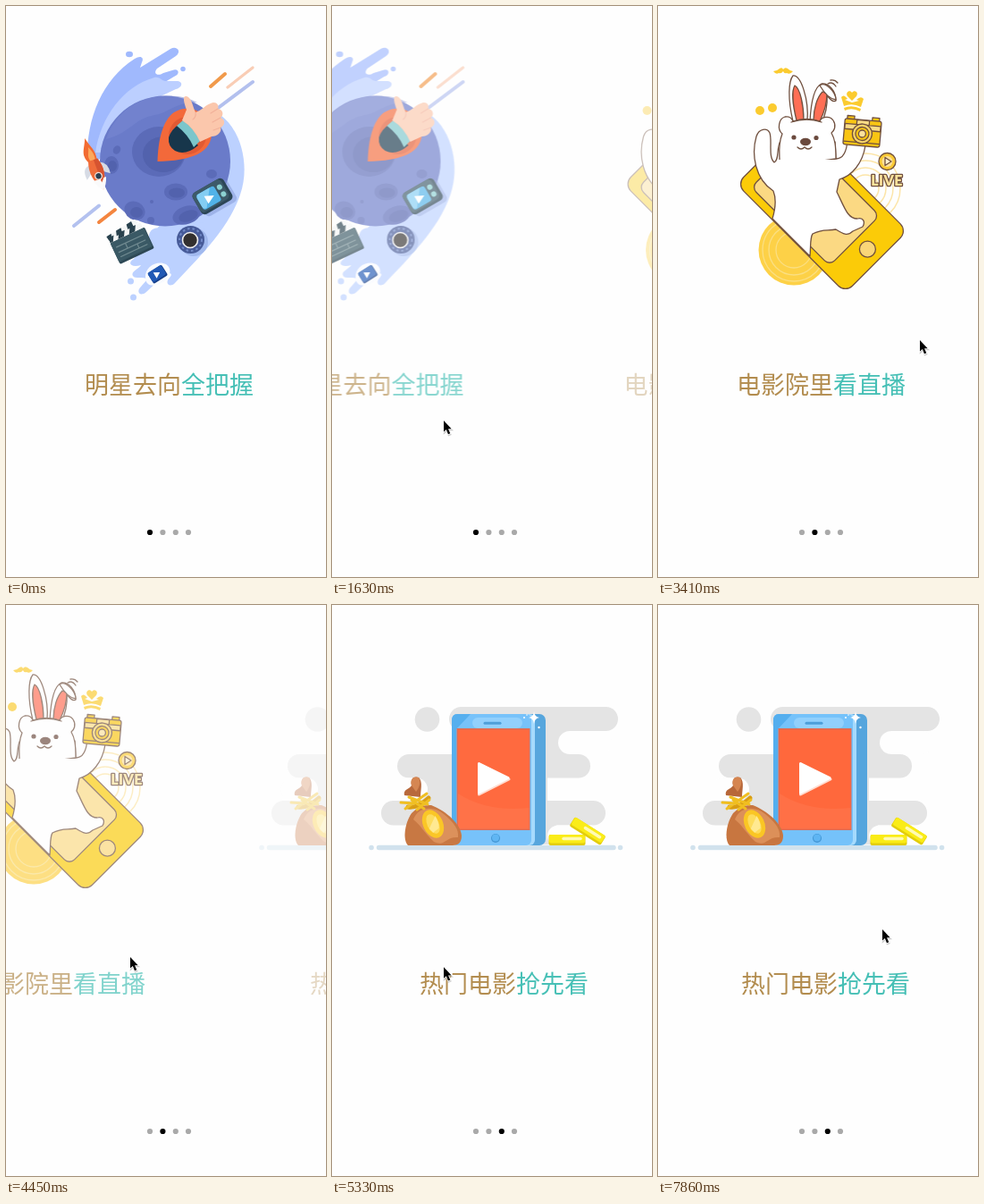
These frames come from a looping animation (358 px wide and 639 px high, 8000 ms). An HTML page:

```html
<!DOCTYPE html>
<html lang="zh">
<head>
<meta charset="utf-8">
<title>Onboarding</title>
<style>
html, body { margin: 0; width: 100%; height: 100%; overflow: hidden; background: #fefefe; }
svg { display: block; }
.title { font: 300 27px "Noto Sans CJK SC", "Noto Sans CJK", sans-serif; fill: #b28c4e; }
.title tspan { fill: #45bfb5; }
.ln { fill: none; stroke-linecap: round; stroke-linejoin: round; }
.ink { stroke: #70503f; stroke-width: 1.3; stroke-linejoin: round; stroke-linecap: round; }
</style>
</head>
<body>
<svg width="358" height="639" viewBox="0 0 358 639">
<g class="page">
  <!-- comet tail -->
  <path fill="#a0b9fd" d="M91 172C90 125 108 82 144 59C150 55 155 57 152 63L150 69L184 48C191 44 197 51 190 56L169 70C164 76 170 79 176 75L186 72C194 69 195 77 188 79L178 85L140 120L104 172Z"/>
  <path fill="#bccfff" d="M100 164C106 124 131 90 166 80C172 79 173 83 178 84L189 84C199 83 198 91 190 93L150 112L112 164Z"/>
  <g fill="#a0b9fd"><ellipse cx="138" cy="54" rx="4" ry="3.2"/><circle cx="198" cy="70.500" r="2.800"/></g>
  <path fill="#bcd1ff" d="M240 122C264 140 273 180 262 211C249 250 214 283 189 310C183 316 177 310 183 304C188 298 181 298 175 303L157 320C150 326 145 320 151 314L158 306C154 302 144 306 142 302C139 297 149 294 151 290C140 293 135 288 143 283L176 240L230 226Z"/>
  <g fill="#bcd1ff"><circle cx="139.500" cy="308" r="3.500"/><circle cx="142.500" cy="326" r="3.500"/></g>
  <g class="ln" stroke-width="4">
    <path stroke="#f19a4b" d="M229 90L245 76"/><path stroke="#f9cdb5" stroke-width="3.200" d="M248 91L276 69"/>
    <path stroke="#b3c0ee" d="M232 118L276 85"/><path stroke="#b3c1ef" d="M76 246L104 223.500"/>
    <path stroke="#f4853f" d="M104 242L122 228"/>
  </g>
  <!-- planet -->
  <circle cx="178" cy="173.500" r="73" fill="#6a7bc9"/>
  <path fill="#7889d3" opacity=".55" d="M112 149C123 118 149 101 179 100.500C195 100 205 103 214 108C190 107 183 119 166 122C143 126 139 142 112 149Z"/>
  <path fill="#bcd1ff" d="M160 256C162 248 170 247 174 250C180 252 186 247 193 248L208 241L225 243L215 264H160Z"/>
  <g fill="#5b6bb8">
    <ellipse cx="171" cy="163" rx="30" ry="28"/><ellipse cx="190" cy="208" rx="13" ry="9.500"/>
    <ellipse cx="144" cy="229" rx="12" ry="10" transform="rotate(30 144 229)"/>
    <ellipse cx="202" cy="234" rx="16" ry="10" transform="rotate(-18 202 234)"/>
    <ellipse cx="118" cy="178" rx="8" ry="10"/><ellipse cx="124" cy="161" rx="4" ry="5" transform="rotate(30 124 161)"/>
    <ellipse cx="230" cy="188" rx="6" ry="5"/><circle cx="163" cy="219" r="2"/><circle cx="162" cy="240" r="4"/>
  </g>
  <g fill="#5262ad">
    <ellipse cx="176" cy="166" rx="23" ry="20"/><ellipse cx="191" cy="209" rx="9" ry="5.500"/>
    <ellipse cx="146" cy="231" rx="7" ry="6"/><ellipse cx="204" cy="235" rx="11" ry="6" transform="rotate(-18 204 235)"/>
    <ellipse cx="119" cy="179" rx="5" ry="6"/>
  </g>
  <!-- pin and thumb -->
  <path fill="#f3693a" d="M169.500 174C170 151 175 128 188 119C205 108 227 119 230 139C232 165 206 173 169.500 174Z"/>
  <circle cx="203" cy="145" r="21" fill="#e15a33"/>
  <path fill="#17364b" d="M182 147Q185 138 194 132L215 156Q201 168 189 162Q181 157 182 147Z"/>
  <path fill="#7cc6cb" d="M191 134L198 128Q211 137 217 151L210 158Q204 144 191 134Z"/>
  <path fill="#fbc7ac" d="M197 128L202 116C199 108 197 100 202 101C208 103 209 113 212 119C219 117 224 110 229 109C234 106 239 110 237 115C243 116 244 122 240 125C246 127 245 134 240 136C242 141 236 146 230 146L217 152Q210 136 197 128Z"/>
  <path class="ln" stroke="#f2b29a" stroke-width="1.200" d="M212 119Q213 124 209 127M237 115L229 120M240 125L231 130M240 136L232 139"/>
  <!-- rocket -->
  <g transform="translate(102 186) rotate(-20) scale(.9)">
    <path fill="#f26b32" d="M-6-15C-12-28-5-32 0-45C2-34 8-26 5-15Z"/><path fill="#fca95d" d="M-3-15C-6-23-1-26 0-33C4-25 4-20 3-15Z"/>
    <path fill="#d6dbe5" d="M-7-11Q-17-10-15 5L-7-1ZM7-11Q17-7 15 7L7 1Z"/>
    <path fill="#ef6d3b" d="M-6-16H6Q13 4 0 23Q-13 4-6-16Z"/><path fill="#fafafa" d="M-8.500 9H8.500Q6 18 0 23Q-6 18-8.500 9Z"/>
    <path fill="#d65430" d="M1-16H6Q13 4 1 14Z"/>
    <circle cy="5" r="5" fill="#f3ddd4"/><circle cy="5" r="3.500" fill="#2c3f50"/>
  </g>
  <!-- television -->
  <g transform="translate(231 213) rotate(-30)">
    <rect x="-17" y="-10" width="40" height="28" rx="5" fill="#8196d4" opacity=".5"/>
    <rect x="-20" y="-14" width="40" height="28" rx="5" fill="#2c4657"/><rect x="-20" y="-14" width="37" height="25" rx="5" fill="#3d5a69"/>
    <rect x="-16" y="-10" width="23" height="19" rx="3" fill="#51b2e8"/><path fill="#83cdf3" d="M-14-10H2L-12 8Q-16 8-16 4V-7Z"/>
    <path fill="#fff" d="M-8-5L2 0L-8 5Z"/><circle cx="12" cy="-5" r="3" fill="#8cd1d2"/><circle cx="12" cy="4" r="3" fill="#8cd1d2"/>
  </g>
  <!-- clapper -->
  <g transform="translate(139.500 265.500) rotate(-25) scale(.9)">
    <rect x="-23" y="-11" width="47" height="29" rx="2" fill="#2d4855"/><rect x="-23" y="-11" width="46" height="26" rx="2" fill="#3a5965"/>
    <path class="ln" stroke="#718b91" stroke-width="1.300" d="M-18-3H18M-18 4H18M-18 10H18M-6-3V4M7 4V10"/>
    <path fill="#f4f6f6" d="M-23-18H22V-11H-23ZM-24-20L17-25L19-19L-23-14Z"/>
    <path fill="#29424e" d="M-22-18H-15L-19-11H-23ZM-8-18H0L-4-11H-12ZM7-18H15L11-11H3ZM-24-20L-17-21L-19-14.500L-23-14ZM-10-21.700L-3-22.500L-4-16.500L-12-15.500ZM5-23.500L12-24.500L12-18L4-17Z"/>
  </g>
  <!-- reel and player -->
  <circle cx="210" cy="264" r="16" fill="#90a9e2" opacity=".6"/><circle cx="206.500" cy="261.500" r="15.500" fill="#465a98"/>
  <circle cx="206.500" cy="261.500" r="12.500" fill="none" stroke="#7189c7" stroke-width="2" stroke-dasharray="2.500 3"/>
  <circle cx="206" cy="262" r="8.500" fill="#33302f" stroke="#eee" stroke-width="1.600"/>
  <path fill="#f9fbff" d="M156 304C155 291 170 284 179 289C188 295 182 308 172 311C163 315 156 312 156 304Z"/>
  <g transform="translate(169 300) rotate(-32) scale(.93)"><rect x="-9.500" y="-7" width="20" height="15" rx="2" fill="#163f8a"/><rect x="-9.500" y="-7" width="19" height="13" rx="2" fill="#2159b5"/><path fill="#fff" d="M-3-4L4 0L-3 4Z"/></g>
  <text class="title" x="88" y="434">明星去向<tspan>全把握</tspan></text>
</g>

<g class="page">
  <circle cx="152" cy="273" r="39.500" fill="#fdd147"/>
  <g fill="none" stroke="#fbdf82" stroke-width="1.300"><circle cx="152" cy="273" r="35"/><circle cx="152" cy="273" r="28"/><circle cx="152" cy="273" r="20"/></g>
  <g fill="none" stroke="#fce5a8" stroke-width="1.500"><circle cx="232" cy="204" r="39"/><circle cx="232" cy="204" r="31"/><circle cx="232" cy="204" r="23"/><circle cx="232" cy="204" r="15"/></g>
  <g transform="translate(183.500 225.500) rotate(45)">
    <rect class="ink" x="-86" y="-49" width="172" height="98" rx="11" fill="#fbcb08"/>
    <rect class="ink" x="-72" y="-39" width="124" height="79" rx="8" fill="#fbd983"/>
    <circle class="ink" cx="69" cy="-3" r="9" fill="#fad678"/>
  </g>
  <!-- rabbit ears -->
  <g class="ink" fill="#fff">
    <path d="M151 129C145 104 146 84 151 78C160 77 169 105 167 129Z"/><path fill="#ff6f55" d="M155 128C150 108 150 94 153 89C159 92 163 111 163 128Z"/>
    <path d="M170 129C171 110 174 91 183 87C191 86 199 95 199 106C196 108 192 104 189 100C190 111 187 123 183 130Z"/>
    <path fill="#ff6f55" d="M174 128C174 115 178 102 184 96L189 98C189 111 185 121 181 129Z"/>
    <path d="M181 89C187 84 199 96 199 105Q190 104 181 89Z"/>
    <path fill="none" d="M190 87Q195 84 199 90M193 83Q198 82 201 86"/>
  </g>
  <!-- bear -->
  <path fill="#fff" d="M122 145H138V182H122Z"/>
  <path class="ink" fill="#fff" d="M137 151C132 160 136 172 130 175C123 169 128 151 125 142C122 136 113 137 110 146C104 167 109 194 129 207C133 217 131 228 128 238L170 280C171 268 170 259 173 255C184 249 190 252 199 250C207 255 212 258 218 252L229 247C232 242 230 236 223 238C212 238 209 226 200 208L203 194C217 190 229 176 232 156L212 150C211 164 207 171 199 171L198 152Z"/>
  <path class="ink" fill="#fff" d="M139 143C133 138 135 126 142 124C147 123 150 126 151 129Q166 124 181 129C183 124 192 122 196 128C200 134 197 140 194 142C198 149 199 156 199 171L136 180C137 169 133 158 139 143Z"/>
  <path fill="#fff" d="M133 172H201V198H131Z"/>
  <path class="ink" fill="none" d="M149 130Q167 124 183 130"/>
  <g fill="#6b4a3e"><circle cx="152" cy="147" r="2.600"/><circle cx="177" cy="147.500" r="2.600"/><ellipse cx="165" cy="152" rx="6" ry="4.200"/></g>
  <path class="ink" fill="none" d="M156 158Q160 162 164 158Q168 162 172 158"/>
  <!-- camera -->
  <g transform="translate(228.500 142) rotate(5)">
    <g class="ink" fill="#f9c513">
      <path d="M-18-14V-18H-10V-14ZM10-14V-18H18V-14Z"/><rect x="-20.500" y="-14.500" width="41" height="29" rx="2.500"/>
      <path fill="#fbdc85" d="M-20-9H20V-3H-20ZM-7-9V-14H7V-9Z"/><path fill="none" d="M-20 11H20"/>
      <circle r="11" cy="1" fill="#fad66a"/><circle r="7.500" cy="1"/><circle r="4" cy="1" fill="#fbe19d"/>
    </g>
  </g>
  <!-- ornaments -->
  <g fill="#fbcb2f">
    <circle cx="114" cy="117" r="5"/><circle cx="128" cy="114" r="5"/>
    <path d="M129 73Q133 73 136 70Q139 68 140 71Q142 68 145 70Q148 73 151 73Q148 77 144 75Q141 76 140 73Q138 76 135 75Q132 77 129 73Z"/>
    <path d="M208 112L205 102Q208 98 212 104L209 105L217 108L225 106L222 105Q227 100 230 104L227 113Q217 108 208 112ZM208 114Q217 110 227 115L226 118Q217 113 209 117ZM217 106L212 101C209 96 215 93 217 97C220 93 225 97 222 101Z"/>
  </g>
  <circle class="ink" cx="256.500" cy="174" r="9.500" fill="#f9c934"/><circle cx="256.500" cy="174" r="6" fill="#fce09a"/><path class="ink" fill="#fff4d2" d="M254 169.500L261 174L254 178.500Z"/>
  <text x="256" y="200.500" text-anchor="middle" font-family="Lato, sans-serif" font-weight="900" font-size="16" letter-spacing=".4" fill="#fce29c" stroke="#70503f" stroke-width="2.600" paint-order="stroke" stroke-linejoin="round">LIVE</text>
  <text class="title" x="88" y="434">电影院里<tspan>看直播</tspan></text>
</g>

<g class="page">
  <g fill="#e4e4e4">
    <circle cx="101.500" cy="128" r="13.800"/><rect x="126" y="114" width="189" height="27" rx="13.500"/>
    <rect x="68" y="167" width="216" height="26.500" rx="13"/><rect x="50" y="219" width="251" height="27.500" rx="13.500"/>
    <path d="M130 140H262V168H130ZM86 193H236V220H86ZM200 245H246V268H200Z"/>
  </g>
  <g fill="#fefefe"><rect x="248" y="141" width="60" height="26" rx="13"/><rect x="60" y="193.500" width="42" height="25.500" rx="12.700"/><rect x="236" y="246.500" width="60" height="24" rx="12"/></g>
  <path class="ln" stroke="#d1e2ed" stroke-width="5.500" d="M47.500 271.500H310M39 271.500H39.100M317.500 271.500H317.600"/>
  <!-- phone -->
  <rect x="150" y="122" width="84" height="147" rx="7" fill="#55a5dd"/><rect x="129" y="122" width="93" height="147" rx="6" fill="#a5dafd"/>
  <rect x="129" y="122" width="89" height="147" rx="6" fill="#75c2fa"/><path fill="#54aeee" d="M129 130Q129 122 135 122H150L134 139V250L129 261Z"/>
  <rect x="152" y="126" width="56" height="12" rx="6" fill="#91d0fc"/>
  <path class="ln" stroke="#4c9ed9" stroke-width="3" d="M166 132.300H183"/>
  <rect x="134.500" y="138" width="82" height="114" fill="#dc6b55"/><rect x="136" y="139.500" width="79.500" height="111" fill="#ff683c"/>
  <path fill="#ff754c" d="M136 211Q168 232 215.500 227V250.500H136Z" opacity=".65"/>
  <g stroke-width="3" stroke-linejoin="round">
    <path fill="#ffddd1" stroke="#ffddd1" d="M159.500 179V212L193 195Z"/>
    <path fill="#fff" stroke="#fff" d="M159.500 177.500V210L192 193.500Z"/>
  </g>
  <circle cx="178" cy="261" r="5" fill="#4396d4"/><circle cx="178" cy="260.500" r="4" fill="#5eb5f3"/>
  <path fill="#fff" d="M221 119Q221.500 125 227 126Q221.500 127 221 133Q220.500 127 215 126Q220.500 125 221 119Z"/>
  <g fill="#fff"><circle cx="210" cy="126" r="1"/><circle cx="226.500" cy="137" r="1.200"/><circle cx="213" cy="123" r=".8"/></g>
  <!-- sack -->
  <path fill="#b76739" d="M76 213C74 206 82 206 84 202C82 194 87 191 92 193C97 198 94 207 94 215Z"/><path fill="#d58550" d="M84 202C82 194 87 191 92 193C95 199 92 205 89 209Z"/>
  <path fill="#c87640" d="M80 269C74 263 76 245 84 233Q93 223 106 224C124 231 139 246 140 258Q140 269 130 269Z"/>
  <path fill="#e2965f" d="M86 240C91 226 108 224 120 234C132 244 137 251 136 260C121 259 122 271 109 265C98 255 95 247 86 240Z" opacity=".8"/>
  <path class="ln" stroke="#d99d13" stroke-width="5" d="M80 226Q90 228 103 216"/>
  <path class="ln" stroke="#f0be20" stroke-width="3" d="M72 221L87 222M81 215L102 223M77 228L101 211M90 229L104 218M84 218L98 228"/>
  <g transform="rotate(-25 108 245)"><ellipse cx="108" cy="245" rx="11" ry="16.500" fill="#fac624"/><ellipse cx="108" cy="245" rx="6.500" ry="11.500" fill="#fddc5c"/><path fill="#ffe991" d="M102 248L114 238Q115 246 112 252L104 254Z"/></g>
  <!-- gold bars -->
  <g id="bar"><rect x="237.500" y="257" width="41" height="12" rx="2" fill="#e3cd09"/><rect x="238" y="257" width="40" height="9.500" rx="2" fill="#faec16"/><path class="ln" stroke="#fffab4" stroke-width="3.500" d="M254 261.500H273"/></g>
  <use href="#bar" transform="rotate(32 281 253) translate(23 -10)"/>
  <text class="title" x="93" y="433.500">热门电影<tspan>抢先看</tspan></text>
</g>

<g id="dots">
  <circle cx="161" cy="589" r="3.100"/><circle cx="175.400" cy="589" r="3.100"/><circle cx="189.800" cy="589" r="3.100"/><circle cx="204" cy="589" r="3.100"/>
</g>
<g id="cursor">
  <path id="arrow" d="M0 0V14.500L3.300 11.500L5.700 17.500L8.300 16.400L5.800 10.600H10Z" transform="translate(.5 1.300) scale(.87)" opacity=".2" stroke="#000" stroke-width="1.800"/>
  <path d="M0 0V14.500L3.300 11.500L5.700 17.500L8.300 16.400L5.800 10.600H10Z" transform="scale(.87)" stroke="#fff" stroke-width="1.600" paint-order="stroke"/>
</g>
</svg>
<script>
const LOOP = 8000, TICKS = 54, PITCH = 368;
// [tick, scroll]
const scroll = [[0, 0], [9, 0], [10, 58], [11, 129.5], [12, 188], [13, 242], [14, 292], [16, 292],
  [17, 320], [18, 350], [19, 364], [20, 368], [26, 368], [27, 380], [30, 489], [33, 630],
  [34, 672], [35, 712], [36, 731], [37, 736]];
// [tick, x, y]
const mouse = [[3, 319, 447], [4, 302, 434], [8, 302, 434], [9, 262, 442], [11, 125, 464], [13, 20, 488], [14, 2, 496],
  [16, 2, 496], [18, 70, 470], [22, 275, 380], [23, 293, 374], [25, 293, 374], [27, 247, 379], [30, 139, 394],
  [33, 9, 450], [35, 70, 425], [39, 290, 346], [40, 312, 341], [41, 322, 341], [44, 322, 341],
  [46, 280, 350], [50, 149, 364], [51, 149, 364], [52, 200, 363], [53, 251, 363]];
const pages = document.querySelectorAll('.page');
const dots = document.querySelectorAll('#dots circle');
const cursor = document.getElementById('cursor');

function at(keys, n) {
  const i = keys.findIndex(k => k[0] >= n);
  if (i < 0) return keys[keys.length - 1].slice(1);
  if (i === 0) return keys[0].slice(1);
  const a = keys[i - 1], b = keys[i], u = (n - a[0]) / (b[0] - a[0]);
  return a.slice(1).map((v, j) => v + (b[j + 1] - v) * u);
}

function draw() {
  const t = performance.now() % LOOP;
  const n = Math.min(TICKS - 1, Math.floor((t + 8) * TICKS / LOOP));
  const [s] = at(scroll, n), [x, y] = at(mouse, n);
  pages.forEach((p, i) => {
    const off = i * PITCH - s;
    p.setAttribute('transform', `translate(${off} 0)`);
    p.setAttribute('opacity', Math.max(0, 1 - Math.abs(off) / PITCH));
  });
  const active = n < 18 ? 0 : n < 35 ? 1 : 2;
  dots.forEach((d, i) => d.setAttribute('fill', i === active ? '#000' : '#a9a9a9'));
  cursor.setAttribute('transform', `translate(${x} ${y})`);
  cursor.setAttribute('visibility', n < 3 ? 'hidden' : 'visible');
  requestAnimationFrame(draw);
}
draw();
</script>
</body>
</html>
```
